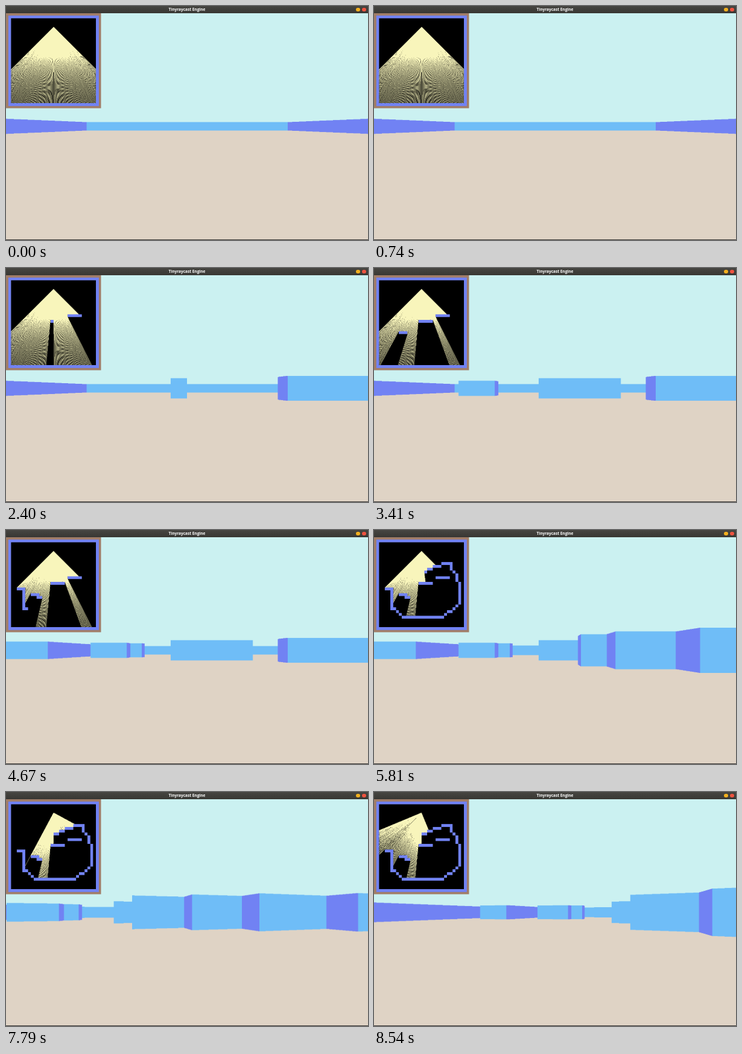
Write an HTML page with a canvas that moves like this. It is 600 px wide and 388 px high and loops after 9540 ms.

```html
<!DOCTYPE html>
<html lang="en">
<head>
<meta charset="utf-8">
<title>Tinyraycast Engine</title>
<style>
  html, body { margin: 0; width: 100%; height: 100%; overflow: hidden; background: #3a3937; }
  #stage { position: relative; width: 600px; height: 388px; overflow: hidden; }
  canvas { position: absolute; left: 0; top: 12px; }
  #bar {
    position: absolute; left: 0; top: 0; width: 600px; height: 12px;
    background: linear-gradient(#474642, #383733);
    color: #fff; font: bold 6.5px/12px "Open Sans", "Noto Sans", sans-serif; text-align: center;
  }
  #bar i { position: absolute; top: 2.6px; width: 6.8px; height: 6.8px; border-radius: 50%; }
</style>
</head>
<body>
<div id="stage">
  <canvas id="view" width="600" height="375"></canvas>
  <div id="bar">Tinyraycast Engine<i style="left:579.8px;background:#f3b01f"></i><i style="left:590px;background:#ee5340"></i></div>
</div>
<script>
const LOOP = 9540;
const W = 1280, H = 800;                          // size before scaling to the stage
const SIZE = 32, CELL = 10, MARGIN = 8, RAY_GAP = 6;
const PLAYER = { x: 16, y: 4 };
const TURN = Math.PI / 32;
const COLOR = {
  sky: '#cbf1f1', floor: '#dfd3c5', face: '#6fbdf7', side: '#7182f3', frame: '#a17d68', ray: [248, 245, 187, 255]
};

// Wall strokes: start, end, key cells
const STROKES = [
  [1010, 1800, [[21, 13], [25, 13]]],
  [2290, 2740, [[15, 15], [19, 15]]],
  [2890, 3700, [[8, 19], [10, 19], [10, 20], [11, 20]]],
  [3890, 4640, [[3, 17], [5, 17], [5, 24], [6, 24]]],
  [4700, 5780, [[7, 25], [9, 27], [23, 27], [26, 25], [29, 21], [29, 15], [28, 12], [26, 8], [23, 8],
    [20, 9], [18, 10], [17, 11]]],
  [5880, 5880, [[16, 11]]]
];

// One long turn to the left, then four short taps to the right: start, end, steps
const tap = k => [7320 + 367 * k, 7430 + 367 * k, -3];
const TURNS = [[6090, 6810, 8], tap(0), tap(1), tap(2), tap(3)];

const screen = document.getElementById('view').getContext('2d');
screen.imageSmoothingQuality = 'high';
const scene = document.createElement('canvas');
scene.width = W;
scene.height = H;
const ctx = scene.getContext('2d');

function rect(color, x, y, w, h) {
  ctx.fillStyle = color;
  ctx.fillRect(x, y, w, h);
}

// Diagonal steps first, then straight ones
function trace(corners) {
  let [x, y] = corners[0];
  const cells = [[x, y]];
  for (const [cx, cy] of corners.slice(1)) {
    while (x !== cx || y !== cy) {
      x += Math.sign(cx - x);
      y += Math.sign(cy - y);
      cells.push([x, y]);
    }
  }
  return cells;
}

const blocks = STROKES.flatMap(([t0, t1, corners]) =>
  trace(corners).map(([x, y], k, all) => ({ x, y, t: t0 + (t1 - t0) * k / Math.max(1, all.length - 1) })));

function headingAt(t) {
  return TURNS.reduce((sum, [t0, t1, steps]) => {
    const done = (t - t0) / (t1 - t0) * (Math.abs(steps) - 1) + 1;
    return t < t0 ? sum : sum + Math.sign(steps) * Math.min(Math.abs(steps), Math.floor(done));
  }, 0);
}

function cast(solid, dx, dy) {
  let cx = PLAYER.x, cy = PLAYER.y, onX = false;
  const stepX = dx < 0 ? -1 : 1, stepY = dy < 0 ? -1 : 1;
  const gapX = Math.abs(1 / dx), gapY = Math.abs(1 / dy);
  let nextX = dx < 0 ? 0 : gapX, nextY = dy < 0 ? 0 : gapY;
  do {
    onX = nextX < nextY;
    if (onX) { nextX += gapX; cx += stepX; }
    else { nextY += gapY; cy += stepY; }
  } while (cx > 0 && cy > 0 && cx < SIZE - 1 && cy < SIZE - 1 && !solid.has(cy * SIZE + cx));
  return { onX, dist: onX ? nextX - gapX : nextY - gapY };
}

function drawMap(walls, rays) {
  const span = SIZE * CELL;
  rect(COLOR.frame, 0, 0, span + 2 * MARGIN, span + 2 * MARGIN);
  rect(COLOR.side, MARGIN, MARGIN, span, span);
  rect('#000', MARGIN + CELL, MARGIN + CELL, span - 2 * CELL, span - 2 * CELL);

  const image = ctx.getImageData(MARGIN, MARGIN, span, span);
  for (const { dx, dy, dist } of rays) {
    const lx = dx * dist * CELL, ly = dy * dist * CELL;
    const n = Math.floor(Math.max(Math.abs(lx), Math.abs(ly)));
    for (let k = 0; k < n; k++) {
      const x = Math.floor(PLAYER.x * CELL + lx * k / n);
      const y = Math.floor(PLAYER.y * CELL + ly * k / n);
      image.data.set(COLOR.ray, 4 * (y * span + x));
    }
  }
  ctx.putImageData(image, MARGIN, MARGIN);
  for (const { x, y } of walls) rect(COLOR.side, MARGIN + x * CELL, MARGIN + y * CELL, CELL, CELL);
}

function draw(walls, angle) {
  const solid = new Set(walls.map(b => b.y * SIZE + b.x));
  const sin = Math.sin(angle), cos = Math.cos(angle);
  rect(COLOR.sky, 0, 0, W, H / 2);
  rect(COLOR.floor, 0, H / 2, W, H / 2);

  const rays = [];
  for (let i = 0; i < W; i++) {
    const c = 2 * i / W - 1;
    const dx = sin + cos * c, dy = cos - sin * c;
    const { dist, onX } = cast(solid, dx, dy);
    const half = Math.round(H / dist / 2);
    rect(onX ? COLOR.side : COLOR.face, i, H / 2 - half, 1, 2 * half);
    if (i % RAY_GAP === 0) rays.push({ dx, dy, dist });
  }
  drawMap(walls, rays);
  screen.drawImage(scene, 0, 0, 600, 375);
}

let shown = '';
function tick() {
  const t = performance.now() % LOOP;
  const walls = blocks.filter(b => b.t <= t);
  const heading = headingAt(t);
  const state = walls.length + ':' + heading;
  if (state !== shown) {
    shown = state;
    draw(walls, heading * TURN);
  }
  requestAnimationFrame(tick);
}
tick();
</script>
</body>
</html>
```
